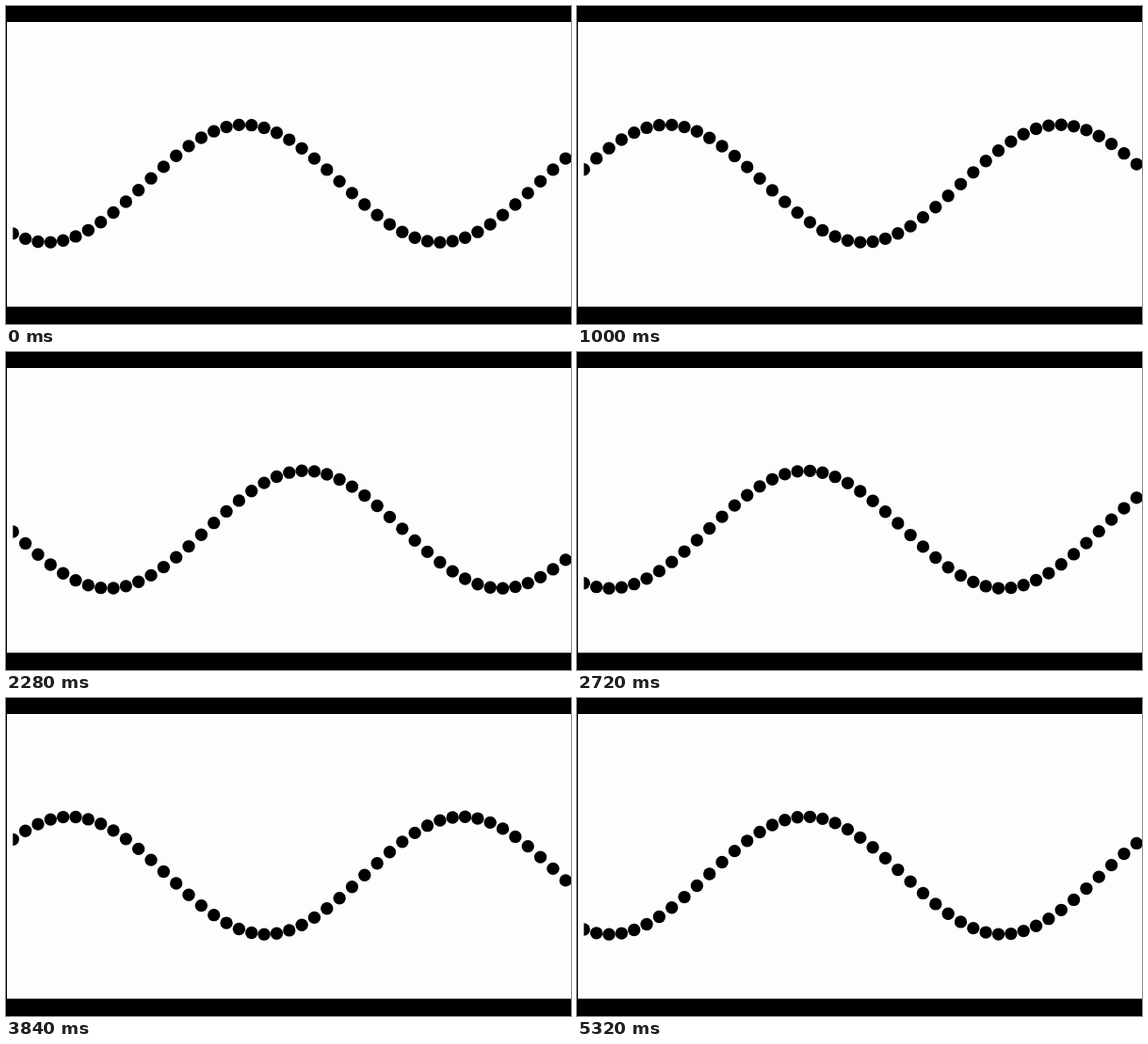
Recreate the animation shown at these times as an HTML page with a canvas. Size 600 by 338 pixels, loop 5.36 s.

```html
<!DOCTYPE html>
<html lang="en">
<head>
<meta charset="utf-8">
<title>Sine wave</title>
<style>
html, body { margin: 0; height: 100%; overflow: hidden; background: #000; }
canvas { display: block; }
</style>
</head>
<body>
<canvas id="stage" width="600" height="338"></canvas>
<script>
const ctx = document.getElementById('stage').getContext('2d');
const STEP = 40, LOOP = 5360;
const DOTS = 45, GAP = 13.34, LEFT = 7.3, MID = 188.7, AMP = 62.5;
const PHASE_GAP = 2 * Math.PI * 16 / 500;

// [tick, phase]: nearly steady drift with one short hold
const KEYS = [[0, 1.018], [13, 2.226], [38, 4.637], [42, 5.011], [43, 5.011],
  [57, 6.32], [78, 8.445], [96, 10.086], [133, 13.725]];

function phaseAt(tick) {
  const i = Math.max(1, KEYS.findIndex(k => k[0] >= tick));
  const [t0, p0] = KEYS[i - 1], [t1, p1] = KEYS[i];
  return p0 + (p1 - p0) * (tick - t0) / (t1 - t0);
}

function draw(ms) {
  const phase = phaseAt(Math.floor(ms % LOOP / STEP));
  ctx.fillStyle = '#000';
  ctx.fillRect(0, 0, 600, 338);
  ctx.fillStyle = '#fefdfe';
  ctx.fillRect(1, 17, 599, 302.6);

  ctx.save();
  ctx.beginPath();
  ctx.rect(7.3, 17, 593, 302);
  ctx.clip();
  ctx.fillStyle = '#000';
  for (let i = 0; i < DOTS; i++) {
    ctx.beginPath();
    ctx.arc(LEFT + i * GAP, MID + AMP * Math.sin(phase + i * PHASE_GAP), GAP / 2, 0, 2 * Math.PI);
    ctx.fill();
  }
  ctx.restore();
}

const start = performance.now();
function loop() {
  draw(performance.now() - start);
  requestAnimationFrame(loop);
}
loop();
</script>
</body>
</html>
```
